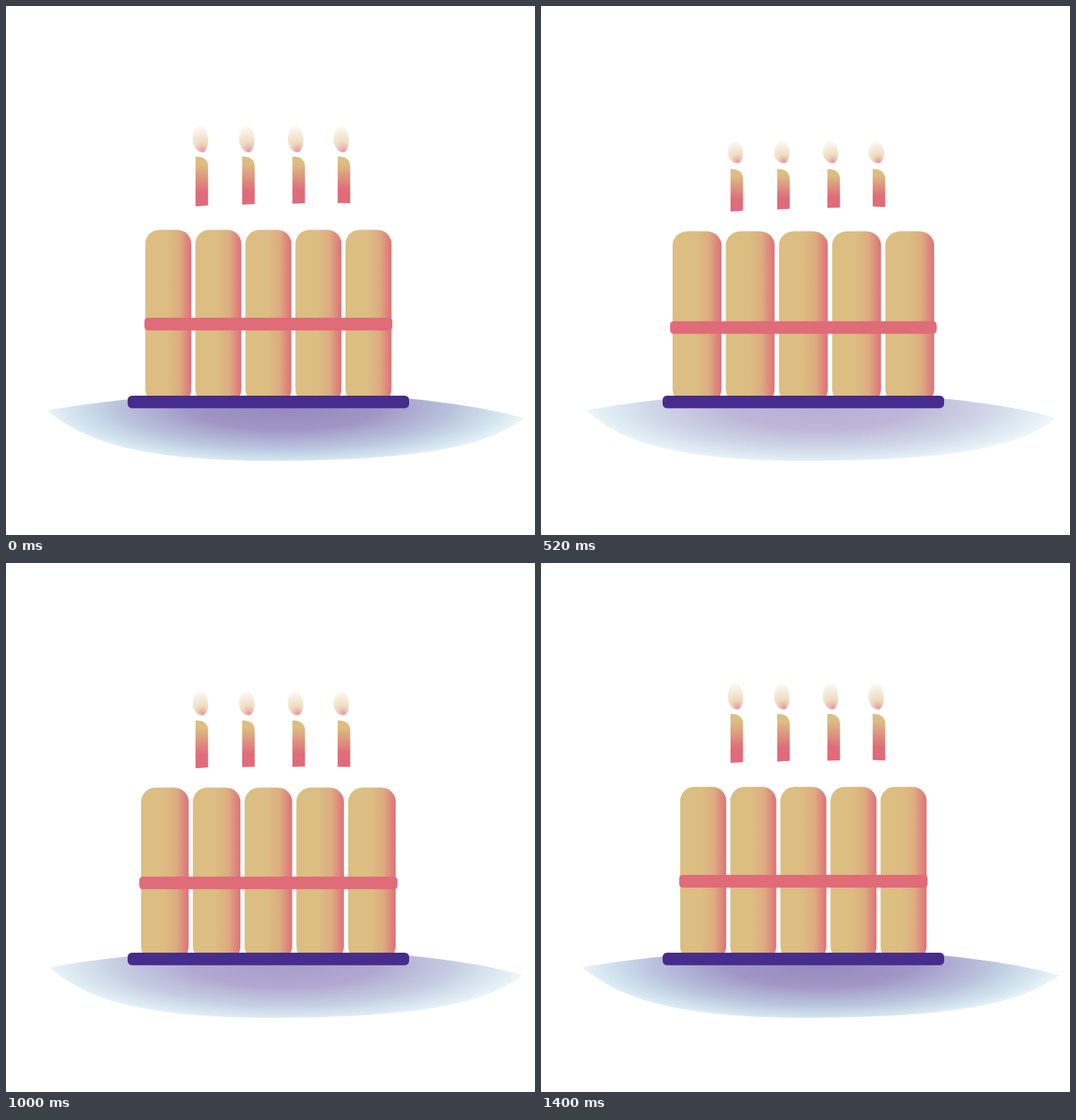
These frames come from a looping animation (748x748 px, 1440 ms). An HTML page with a canvas:

```html
<!DOCTYPE html>
<html lang="en">
<head>
<meta charset="utf-8">
<title>Birthday cake</title>
<style>
  html, body { margin: 0; height: 100%; overflow: hidden; background: #fff; }
  canvas { display: block; }
</style>
</head>
<body>
<canvas id="stage" width="748" height="748"></canvas>
<script>
const ctx = document.getElementById('stage').getContext('2d');
const LOOP = 1440, STEP = 40, MID = 371;
const GOLD = '220,190,130', RED = '224,107,121';

// Looping motion curves: values at shared key times
const times = [0, 200, 520, 620, 840, 1000, 1240, 1400];
const squash = [0, .36, .91, .98, .75, .5, .17, .02];
const firstDrop = [0, 2, 7.5, 9, 9, 7, 2.5, -.5];
const lastDrop = [0, 2, 5.2, 6.5, 9, 9.5, 4.3, .2];

const candles = [
  { x: 268, flame: 275, base: 283.2, slant: -1.2 },
  { x: 334, flame: 340.5, base: 280.9, slant: -.8 },
  { x: 405, flame: 409.5, base: 279.5, slant: -.4 },
  { x: 469, flame: 474, base: 278.4, slant: .6 }
];

function sample(values, t) {
  const n = times.length;
  const at = i => {
    const k = (i + n) % n;
    return [times[k] + LOOP * Math.floor(i / n), values[k]];
  };
  let i = n - 1;
  while (times[i] > t) i--;
  const [[ta, a], [tb, b], [tc, c], [td, d]] = [at(i - 1), at(i), at(i + 1), at(i + 2)];
  const span = tc - tb, u = (t - tb) / span;
  const m0 = (c - a) / (tc - ta) * span, m1 = (d - b) / (td - tb) * span;
  const u2 = u * u, u3 = u2 * u;
  return (2 * u3 - 3 * u2 + 1) * b + (u3 - 2 * u2 + u) * m0
       + (3 * u2 - 2 * u3) * c + (u3 - u2) * m1;
}

function withStops(gradient, stops) {
  for (const [at, rgb, alpha = 1] of stops) gradient.addColorStop(at, `rgba(${rgb},${alpha})`);
  return gradient;
}

function box(x, y, w, h, r, fill) {
  ctx.beginPath();
  ctx.roundRect(x, y, w, h, r);
  ctx.fillStyle = fill;
  ctx.fill();
}

function drawShadow(p) {
  const left = 58 + 8 * p, right = 733 - 5 * p, fade = 1 - .35 * p;
  ctx.save();
  ctx.beginPath();
  ctx.moveTo(left, 572);
  ctx.bezierCurveTo(100, 564, 140, 560, 200, 553);
  ctx.lineTo(545, 553);
  ctx.bezierCurveTo(630, 560, 690, 571, right, 583);
  ctx.bezierCurveTo(690, 612, 630, 643, 370, 643);
  ctx.bezierCurveTo(160, 643, 100, 604, left, 572);
  ctx.translate(395, 565);
  ctx.scale(340, 86);
  ctx.fillStyle = withStops(ctx.createRadialGradient(0, 0, 0, 0, 0, 1), [
    [0, '70,44,140', .57 * fade],
    [.4, '70,48,143', .51 * fade],
    [.7, '60,82,158', .35 * fade],
    [.9, '40,125,178', .2 * fade],
    [1, '40,140,185', .1 * fade]
  ]);
  ctx.fill();
  ctx.restore();
}

function drawCake(p) {
  const top = 316.5 + 2.2 * p, scale = 1 + 12 * p / 174;
  ctx.save();
  ctx.translate(MID, 0);
  ctx.scale(scale, 1);
  for (let i = 0; i < 5; i++) {
    const x = -174 + 70.75 * i;
    box(x, top, 65, 562 - top, 20, withStops(ctx.createLinearGradient(x, 0, x + 65, 0), [
      [0, GOLD], [.46, GOLD], [.74, '221,172,129'], [1, '224,112,121']
    ]));
  }
  ctx.restore();
  const half = 175.3 + 14.5 * p;
  box(MID - half, 440.8 + 5.5 * p, 2 * half, 18 - .4 * p, 5, `rgb(${RED})`);
  box(172, 551, 398, 17.7, 6, 'rgb(70,44,140)');
}

function drawCandle({ x, base, slant }, top, drop) {
  const bottom = base + drop, right = x + 17.7;
  ctx.beginPath();
  ctx.moveTo(x, top);
  ctx.lineTo(x + 4, top);
  ctx.bezierCurveTo(x + 12, top + .5, right, top + 6, right, top + 13);
  ctx.lineTo(right, bottom + slant);
  ctx.lineTo(x, bottom);
  ctx.fillStyle = withStops(ctx.createLinearGradient(0, top, 0, bottom), [
    [0, GOLD], [.15, GOLD], [.72, RED], [1, RED]
  ]);
  ctx.fill();
}

function drawFlame(x, p) {
  const top = 169 + 24.5 * p, bottom = 207 + 17 * p, h = bottom - top;
  ctx.beginPath();
  ctx.moveTo(x, top);
  ctx.bezierCurveTo(x + 7, top, x + 11, top + h * .35, x + 11, top + h * .55);
  ctx.bezierCurveTo(x + 11, top + h * .8, x + 7, bottom, x + 3, bottom);
  ctx.bezierCurveTo(x - 4, bottom, x - 11, top + h * .8, x - 11, top + h * .5);
  ctx.bezierCurveTo(x - 11, top + h * .3, x - 7, top, x, top);
  const y = bottom - 3;
  ctx.fillStyle = withStops(ctx.createRadialGradient(x + 3, y, 0, x + 3, y, h), [
    [0, RED, .7], [.14, '222,140,125', .58], [.32, GOLD, .5], [.6, GOLD, .3], [.92, GOLD, .06]
  ]);
  ctx.fill();
}

function draw(now) {
  const t = Math.floor(now % LOOP / STEP) * STEP;
  const p = sample(squash, t), first = sample(firstDrop, t), last = sample(lastDrop, t);
  ctx.clearRect(0, 0, 748, 748);
  drawShadow(p);
  drawCake(p);
  candles.forEach((candle, i) => {
    drawCandle(candle, 213 + 19.6 * p, first + (last - first) * i / 3);
    drawFlame(candle.flame, p);
  });
}

let start;
function frame(now) {
  start ??= now;
  draw(now - start);
  requestAnimationFrame(frame);
}
draw(0);
requestAnimationFrame(frame);
</script>
</body>
</html>
```
